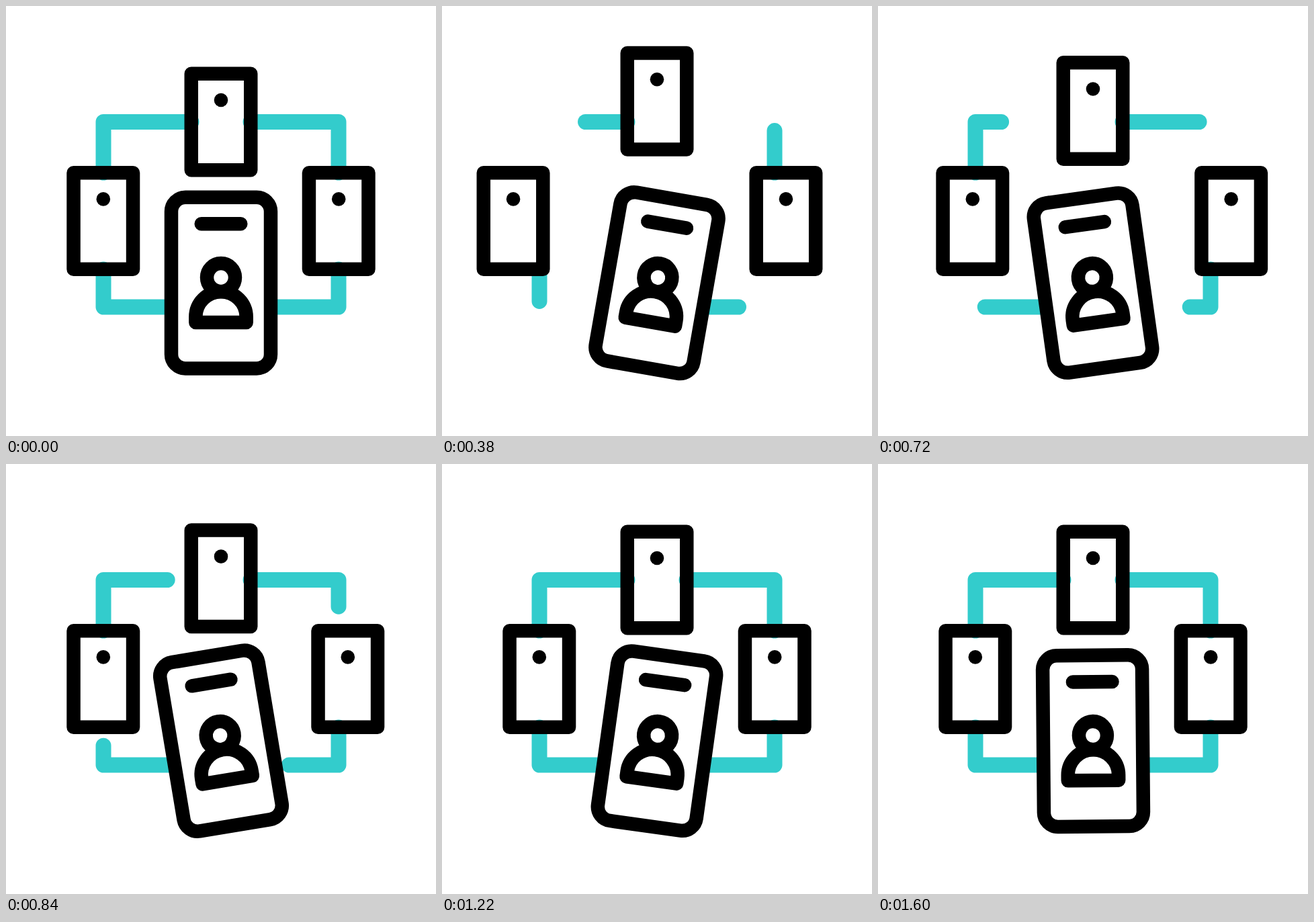
An HTML page that plays this animation: 640 px wide and 640 px high, repeating every 1.62 s.

```html
<!DOCTYPE html>
<html lang="en">
<head>
<meta charset="utf-8">
<title>Connected phones</title>
<style>
  html, body { margin: 0; width: 100%; height: 100%; overflow: hidden; background: #fff; }
  svg { display: block; width: 100%; height: 100%; }
  svg { fill: none; stroke: #000; stroke-width: 20.5; stroke-linecap: round; stroke-linejoin: round; }
  #links { stroke: #3cc; stroke-width: 23; }
</style>
</head>
<body>
<svg viewBox="0 0 640 640">
  <defs>
    <g id="phone">
      <path d="M-44.25 0H44.25V143.5H-44.25Z"/>
      <circle cy="39.2" r="10.3" fill="#000" stroke="none"/>
    </g>
  </defs>
  <g id="links"></g>
  <use id="left" href="#phone"/>
  <use id="top" href="#phone"/>
  <use id="right" href="#phone"/>
  <g id="main">
    <rect x="246" y="284.75" width="148" height="254.75" rx="21" fill="#fff"/>
    <path d="M290.7 324.3H349.3"/>
    <circle cx="320" cy="404" r="21"/>
    <path d="M282.3 471V463A37.7 37.7 0 0 1 357.7 463V471Z"/>
  </g>
</svg>
<script>
const LOOP = 1620;
const byId = id => document.getElementById(id);

// Clockwise connections: main, left, top, right and back to main.
const routes = [
  'M246 448H145V392',
  'M145 248V172.5H276',
  'M364 172.5H495V248',
  'M495 392V448H394'
];

// Eased progress from 0 to 1 between two times.
function ease(t, from, to) {
  const u = Math.min(1, Math.max(0, (t - from) / (to - from)));
  return u * u * (3 - 2 * u);
}

// Out and back again, 400 ms each way.
const nudge = (t, start) =>
  39 * (ease(t, start, start + 400) - ease(t, start + 400, start + 800));

const sway = t =>
  10 * ease(t, 0, 400) - 20 * ease(t, 400, 800) +
  18 * ease(t, 800, 1200) - 8.5 * ease(t, 1200, 1600);

function addLinks() {
  return routes.map(d => {
    const path = document.createElementNS('http://www.w3.org/2000/svg', 'path');
    path.setAttribute('d', d);
    path.setAttribute('pathLength', 1);
    path.setAttribute('stroke-dasharray', '1 2');
    byId('links').append(path);
    return path;
  });
}

const leaving = addLinks();
const arriving = addLinks();

function trim(paths, offset) {
  for (const path of paths) {
    path.setAttribute('stroke-dashoffset', offset);
    path.style.display = Math.abs(offset) < 0.9995 ? '' : 'none';
  }
}

function place(id, x, y) {
  byId(id).setAttribute('transform', `translate(${x} ${y})`);
}

function draw(now) {
  const t = now % LOOP;
  trim(leaving, -ease(t, 0, 600));
  trim(arriving, 1 - ease(t, 400, 1000));
  place('left', 144.8 - nudge(t, 0), 248.2);
  place('top', 320, 100.75 - nudge(t, 100));
  place('right', 495.2 + nudge(t, 200), 248.2);
  byId('main').setAttribute('transform', `rotate(${sway(t)} 320 412.1)`);
}

const start = performance.now();
function tick() {
  draw(performance.now() - start);
  requestAnimationFrame(tick);
}
tick();
</script>
</body>
</html>
```
